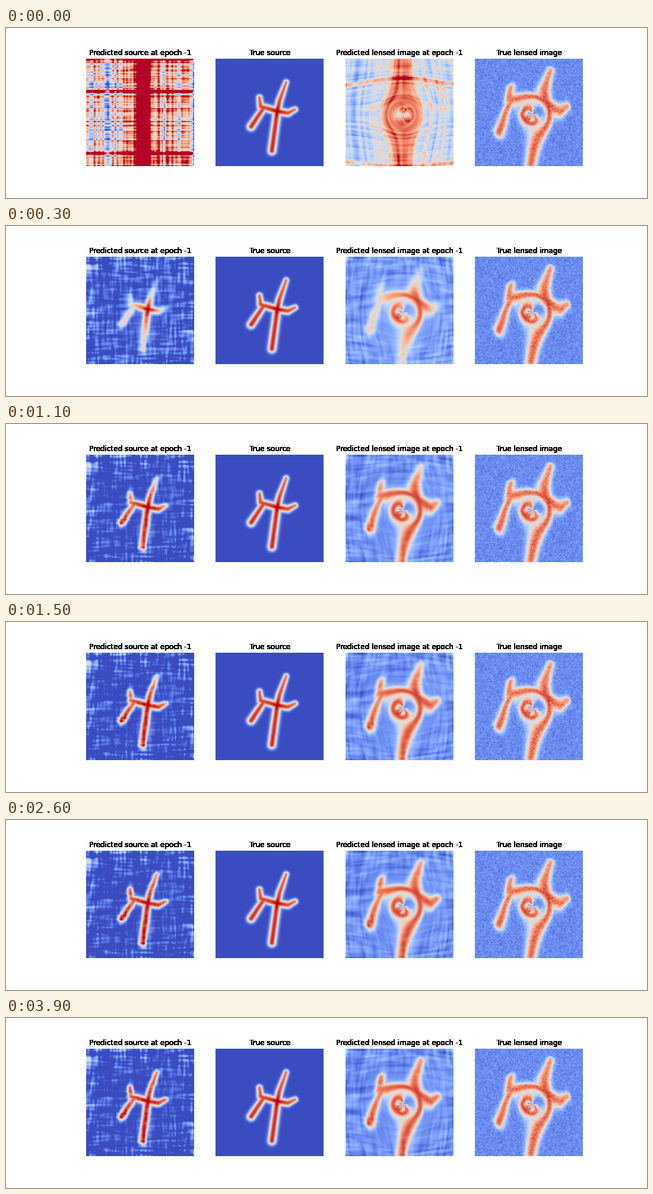
Recreate the animation shown at these times as a matplotlib script. Size 1080 by 288 pixels, loop 4 s.

```python
import numpy as np
import matplotlib.pyplot as plt
from matplotlib.animation import FuncAnimation

WIDTH, HEIGHT, DPI = 1080, 288, 72
FRAMES, INTERVAL = 40, 100
N = 100                       # grid cells per panel side
SIDE = 837 / 4.6              # panel side in pixels
LEFT, BOTTOM, STEP = 135, 54, SIDE * 1.2
LENS_X, LENS_Y, EINSTEIN = 97, 95, 22.75
JOIN_X, JOIN_Y = 104, 89      # where the strokes cross

axis = (np.arange(N) + 0.5) * SIDE / N
X, Y = np.meshgrid(axis, axis)

# Pen path of the figure: x, y, half-width
STROKES = [
    [(119, 40, 4.7), (108, 71, 6), (JOIN_X, JOIN_Y, 6.6), (95, 156, 6.8)],
    [(74, 66, 5), (76, 81, 6), (JOIN_X, JOIN_Y, 6.6), (122, 92, 6), (134, 86, 4.7)],
    [(80, 85, 6), (60, 115, 6.8)],
]


def smooth(field, length, along):
    kernel = np.hanning(length + 2)
    kernel /= kernel.sum()
    return np.apply_along_axis(np.convolve, along, field, kernel, mode="same")


def streaks(rng):
    """Unit-variance texture of crossing horizontal and vertical streaks."""
    flat, tall = (smooth(smooth(rng.normal(size=(N, N)), 23, a), 2, 1 - a)
                  for a in (1, 0))
    field = flat / flat.std() + tall / tall.std()
    return field / field.std()


def drawing(n=None):
    """The figure as learned after n frames, or complete when n is None."""
    image = np.zeros((N, N))
    for stroke in STROKES:
        for (x0, y0, w0), (x1, y1, w1) in zip(stroke, stroke[1:]):
            dx, dy = x1 - x0, y1 - y0
            u = np.clip(((X - x0) * dx + (Y - y0) * dy) / (dx * dx + dy * dy), 0, 1)
            px, py, width = x0 + u * dx, y0 + u * dy, w0 + u * (w1 - w0)
            level = 0.55 + 0.062 * width
            if n is not None:
                # Thin parts far from the crossing are learned last.
                reach = np.hypot(px - JOIN_X, py - JOIN_Y)
                level = level * (1 - np.exp(-n / (0.9 + reach / 20 * (7 / width) ** 4)))
            dist = np.hypot(X - px, Y - py)
            image = np.maximum(image, level * np.exp(-(dist / width) ** 2.3))
    core = np.exp(-((X - JOIN_X) ** 2 + (Y - JOIN_Y) ** 2) / 60)
    return image + 0.07 * core * (n is None or n > 0)


def sample(image, x, y):
    """Bilinear lookup at pixel positions."""
    gx = np.clip(x * N / SIDE - 0.5, 0, N - 1.001)
    gy = np.clip(y * N / SIDE - 0.5, 0, N - 1.001)
    ix, iy = gx.astype(int), gy.astype(int)
    fx, fy = gx - ix, gy - iy
    top = image[iy, ix] * (1 - fx) + image[iy, ix + 1] * fx
    low = image[iy + 1, ix] * (1 - fx) + image[iy + 1, ix + 1] * fx
    return top * (1 - fy) + low * fy


def lensed(image):
    """Image of the source behind an isothermal lens."""
    rx, ry = X - LENS_X, Y - LENS_Y
    shrink = 1 - EINSTEIN / np.maximum(np.hypot(rx, ry), 0.1)
    return sample(image, LENS_X + rx * shrink, LENS_Y + ry * shrink)


# Untrained output: plaid of random rows and columns with a few strong bands
rng = np.random.default_rng(7)
columns = 0.7 * np.exp(-((axis - 95) / 11) ** 4) + 0.22 * np.exp(-((axis - 95) / 45) ** 2)
columns += smooth(rng.normal(0, 0.27, N), 2, 0)
rows = sum(0.6 * np.exp(-((axis - y) / 3) ** 4) for y in (1, 55, 161))
rows += rng.normal(0, 0.17, N)
START = 0.63 + columns + rows[:, None] + 0.09 * streaks(rng)

# Residual noise while training, strongest along the border
border = np.minimum(np.minimum(X, SIDE - X), np.minimum(Y, SIDE - Y))
edge = np.exp(-border / 10)
quiet = 1 - 0.75 * np.exp(-((X - 95) ** 2 + (Y - 95) ** 2) / 2600)
corner = np.exp(-(X / 9) ** 2 - ((Y - 24) / 16) ** 2)
EARLY = 0.08 + 0.13 * quiet * streaks(rng)
LATE = (0.08 + 0.12 * edge) * quiet * streaks(rng) + 0.34 * corner


def predicted(n):
    early = EARLY * np.exp(-n / 4.5) * (n > 0)
    return drawing(n) + START * np.exp(-1.4 * n) + early + LATE * (1 - np.exp(-n / 2))


def predicted_lensed(n, source):
    gain = 0.74 - 0.32 * np.exp(-n)
    return 0.17 + gain * lensed(source)


fig = plt.figure(figsize=(WIDTH / DPI, HEIGHT / DPI), dpi=DPI, facecolor="white")


def panel(index, title, image):
    ax = fig.add_axes([(LEFT + index * STEP) / WIDTH, BOTTOM / HEIGHT,
                       SIDE / WIDTH, SIDE / HEIGHT])
    ax.axis("off")
    # Stacked copies give the heavy, hard-edged lettering.
    for _ in range(50):
        ax.text(0.5, 1 + 6 / SIDE, title, transform=ax.transAxes, ha="center",
                va="baseline", fontsize=12, family="DejaVu Sans", color="black")
    return ax.imshow(image, cmap="coolwarm", vmin=0, vmax=1)


truth = drawing()
observed = 0.15 + 0.74 * lensed(truth) + rng.normal(0, 0.037, (N, N))
blank = np.zeros((N, N))
source_view = panel(0, "Predicted source at epoch -1", blank)
panel(1, "True source", truth)
lensed_view = panel(2, "Predicted lensed image at epoch -1", blank)
panel(3, "True lensed image", observed)


def update(n):
    source = predicted(n)
    source_view.set_data(source)
    lensed_view.set_data(predicted_lensed(n, source))
    return source_view, lensed_view


anim = FuncAnimation(fig, update, frames=FRAMES, interval=INTERVAL,
                     repeat=True, repeat_delay=0, blit=False)
plt.show()
```
